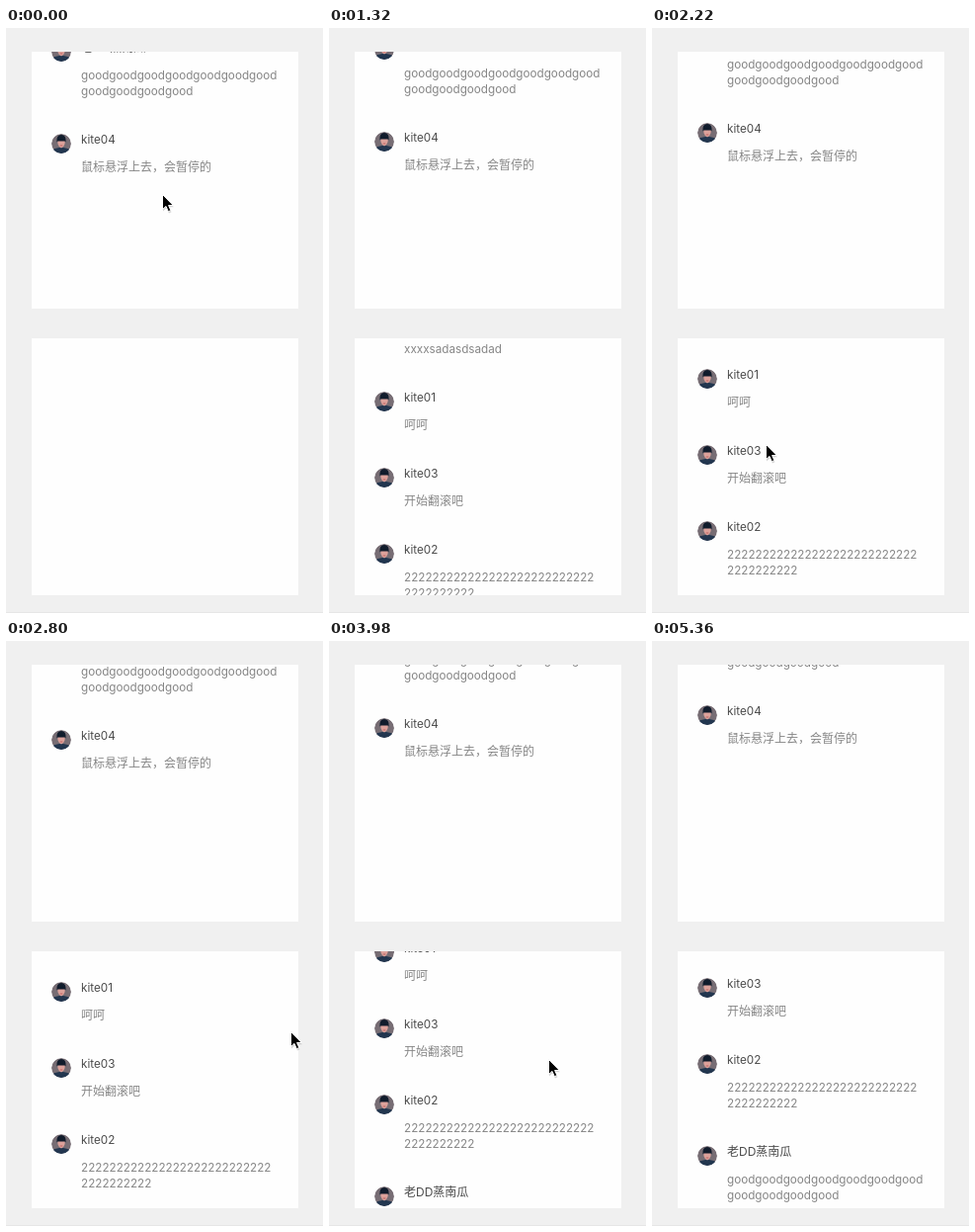
These frames come from a looping animation (321 px wide and 592 px high, 5.46 s). An HTML page:

```html
<!DOCTYPE html>
<html lang="zh-CN">
<head>
<meta charset="utf-8">
<title>Scrolling comments</title>
<style>
  html, body { margin: 0; width: 100%; height: 100%; overflow: hidden; background: #f0f0f0; }
  svg { display: block; width: 321px; height: 592px; }
  text { font: 12px Inter, "Noto Sans CJK SC", "Noto Sans CJK", sans-serif; }
  .latin { font-size: 11.7px; }
  .name { fill: #4a4a4a; }
  .body { fill: #868686; }
</style>
</head>
<body>
<svg viewBox="0 0 321 592" xmlns="http://www.w3.org/2000/svg">
  <defs>
    <clipPath id="topClip"><rect x="26" y="24" width="270" height="260"/></clipPath>
    <clipPath id="bottomClip"><rect x="26" y="314" width="270" height="260"/></clipPath>
    <clipPath id="round"><circle r="10"/></clipPath>
    <g id="avatar" clip-path="url(#round)">
      <circle r="10" fill="#776d74"/>
      <path d="M-10 10V7Q-7 4.500 -2 4H2Q7 4.500 10 7V10Z" fill="#22364f"/>
      <path d="M-3.600 -3H3.600V0Q2.800 3 0 4.600Q-2.800 3 -3.600 0Z" fill="#dda29b"/>
      <path d="M-4.600 -1.500Q-5.200 -8.800 0 -9Q5.200 -8.800 4.600 -1.500L3.600 -2.600H-3.600Z" fill="#111c2c"/>
      <path d="M-1.300 2H1.300" stroke="#b5504f" stroke-width=".8"/>
    </g>
  </defs>
  <rect width="321" height="592" fill="#f0f0f0"/>
  <rect y="591" width="321" height="1" fill="#e6e6e6"/>
  <rect x="26" y="24" width="270" height="260" fill="#fefefe"/>
  <rect x="26" y="314" width="270" height="260" fill="#fefefe"/>
  <g clip-path="url(#topClip)"><g id="topList"></g></g>
  <g clip-path="url(#bottomClip)"><g id="bottomList"></g></g>
  <g id="cursor">
    <path d="M1 2.500V17.500L4.500 14.300L7 19.500L9.500 18.300L7.200 13.300H12Z" opacity=".16"/>
    <path d="M.5 .5V15.600L4 12.400L6.300 17.700L8.900 16.600L6.600 11.500H11.300Z" stroke="#fff"/>
  </g>
</svg>
<script>
const LOOP = 5460, LAST_UPDATE = 5360, UPDATE_STEP = 147.5;
const comments = [
  ["kite05", "xxxxsadasdsadad"],
  ["kite01", "呵呵"],
  ["kite03", "开始翻滚吧"],
  ["kite02", "2".repeat(27), "2".repeat(10)],
  ["老DD蒸南瓜", "good".repeat(7), "good".repeat(4)],
  ["kite04", "鼠标悬浮上去，会暂停的"]
];

const byId = id => document.getElementById(id);
const cursor = byId("cursor");

// Scroll speeds are in pixels per ms; y is where the first name starts.
const top_ = { node: byId("topList"), y: -304, start: 0, speed: 0.01 };
const bottom = { node: byId("bottomList"), y: 344, start: 150, speed: 0.04 };

// The pointer is slowest at its turning point and speeds up towards the exit.
const visits = [
  { list: top_, start: 0, turn: 0, end: 1120, x: 158, y: 168, dx: 162, dy: 30 },
  { list: bottom, start: 1895, turn: 2220, end: 2815, x: 115, y: 421, dx: 180, dy: -27 },
  { list: bottom, start: 3830, turn: 4080, end: 4335, x: 215, y: 425, dx: 50, dy: -14 }
];

function textAt(y, kind, value) {
  const latin = /^[\x00-\x7f]+$/.test(value) ? " latin" : "";
  return `<text x="76" y="${y}" class="${kind}${latin}">${value}</text>`;
}

function listMarkup() {
  let y = 0;
  return comments.map(([name, ...lines]) => {
    const item = `<use href="#avatar" x="56" y="${y + 4}"/>` + textAt(y + 4, "name", name) +
      lines.map((line, i) => textAt(y + 32 + 16 * i, "body", line)).join("");
    y += 61 + 16 * lines.length;
    return item;
  }).join("");
}

function moveTo(node, x, y) {
  node.setAttribute("transform", `translate(${Math.round(x)} ${Math.round(y)})`);
}

// The screen refreshes in steps, not continuously.
function lastUpdate(t) {
  return t >= LAST_UPDATE ? LAST_UPDATE : Math.floor((t + 8) / UPDATE_STEP) * UPDATE_STEP;
}

// A list stands still while the pointer is over it.
function scrolled(list, t) {
  const paused = visits.filter(v => v.list === list)
    .reduce((sum, v) => sum + Math.max(0, Math.min(t, v.end) - v.start), 0);
  return Math.round((t - list.start - paused) * list.speed);
}

function drawList(list, t) {
  list.node.style.display = t < list.start - 8 ? "none" : "";
  moveTo(list.node, 0, list.y - scrolled(list, t));
}

function drawCursor(t) {
  const visit = visits.find(v => t >= v.start && t < v.end);
  cursor.style.display = visit ? "" : "none";
  if (!visit) return;
  const reach = ((t - visit.turn) / (visit.end - visit.turn)) ** 2;
  moveTo(cursor, visit.x + visit.dx * reach, visit.y + visit.dy * reach);
}

function render(elapsed) {
  const t = lastUpdate(elapsed % LOOP);
  drawList(top_, t);
  drawList(bottom, t);
  drawCursor(t);
}

top_.node.innerHTML = bottom.node.innerHTML = listMarkup();
const start = performance.now();
function tick() {
  render(performance.now() - start);
  requestAnimationFrame(tick);
}
tick();
</script>
</body>
</html>
```
